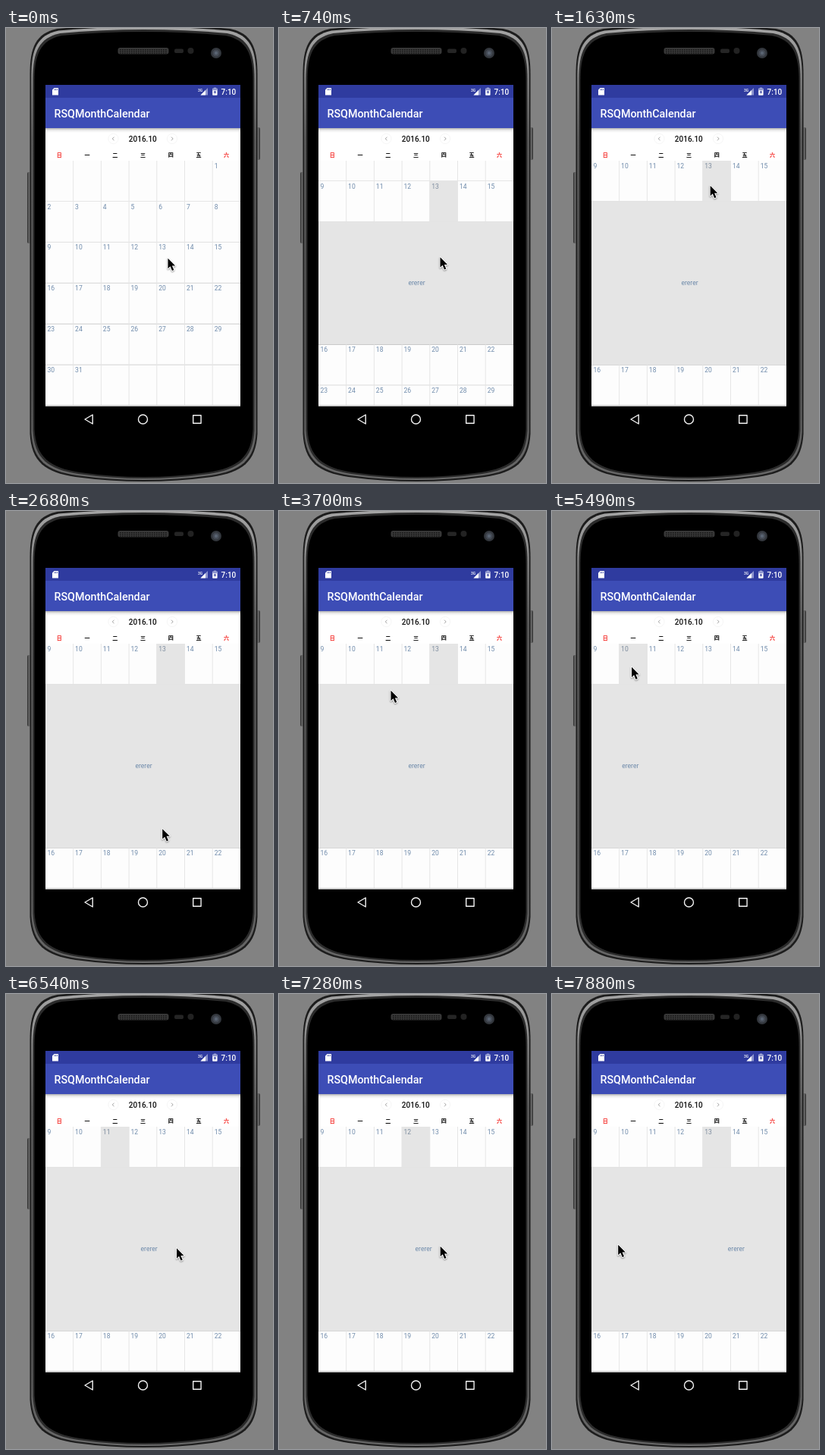
An HTML page with a canvas that plays this animation: 352 by 600 pixels, repeating every 8000 ms.

```html
<!DOCTYPE html>
<html lang="zh">
<head>
<meta charset="utf-8">
<title>Month calendar</title>
<style>
html, body { margin: 0; width: 100%; height: 100%; overflow: hidden; background: #828282; }
canvas { display: block; width: 352px; height: 600px; }
</style>
</head>
<body>
<canvas id="stage"></canvas>
<script>
const W = 352, H = 600, LOOP = 8000, STEP = 148.5;
const canvas = document.getElementById('stage');
const ratio = window.devicePixelRatio || 1;
canvas.width = W * ratio;
canvas.height = H * ratio;
const c = canvas.getContext('2d');

const LEFT = 52, RIGHT = 309, WIDE = RIGHT - LEFT;
const TOP = 175, BOTTOM = 498;
const COL = WIDE / 7, ROW = (BOTTOM - TOP) / 6;
const GREY = '#e5e5e5', LINE = '#e4e4e4', BLUE = '#6f8bab', DARK_BLUE = '#2f3b9f';
const ROBOTO = 'Roboto, sans-serif';
const CJK = '"Noto Sans CJK SC", "Noto Sans CJK JP", "Noto Sans CJK", sans-serif';

// All motion is timed in steps
const TAPS = [27.2, 32.53, 36.35], TAP_TIME = 1.45;
const SWIPE_START = 41, SWIPE_EVERY = 5.08, SWIPE_TIME = 3.6;
const HOME = { x: 213.5, y: 303 };
const MOVES = [
  { from: 0, to: 3, x: 212.5, y: 301.5 },
  { from: 7, to: 11, x: 208.7, y: 207.3 },
  { from: 12, to: 20, x: 222.5, y: 457.5, bow: -20 },
  { from: 20, to: 25, x: 147.5, y: 236 },
  { from: 25, to: 27, x: 170, y: 204 },
  { from: 28, to: 31, x: 136, y: 201 },
  { from: 32, to: 35, x: 105, y: 205 },
  { from: 37, to: 39, x: 216, y: 318 },
  { from: 40, to: 41, x: 225, y: 336 }
];

const clamp = k => Math.max(0, Math.min(1, k));
const smooth = k => k * k * (3 - 2 * k);
const settle = k => 1 - (1 - clamp(k)) ** 2;

// Each tap goes back one day, each swipe forward one day
function pageAt(step) {
  let page = 13;
  TAPS.forEach(tap => page -= settle((step - tap) / TAP_TIME));
  for (let i = 0; i < 3; i++) {
    page += settle((step - SWIPE_START - i * SWIPE_EVERY) / SWIPE_TIME);
  }
  return page;
}

function pointerAt(step) {
  let { x, y } = HOME;
  for (const move of MOVES) {
    const k = clamp((step - move.from) / (move.to - move.from));
    x += (move.x - x) * smooth(k) + (move.bow || 0) * Math.sin(Math.PI * k);
    y += (move.y - y) * smooth(k);
  }
  const since = step - SWIPE_START;
  if (since > 0) {
    x -= 147 * Math.sin(Math.PI * clamp(since % SWIPE_EVERY / 3));
    y -= since / 2;
  }
  return [x, y];
}

function rect(x, y, w, h, fill) {
  c.fillStyle = fill;
  c.fillRect(x, y, w, h);
}

function round(x, y, w, h, r, fill) {
  c.beginPath();
  c.roundRect(x, y, w, h, r);
  c.fillStyle = fill;
  c.fill();
}

function disc(x, y, r, fill) {
  c.beginPath();
  c.arc(x, y, r, 0, 7);
  c.fillStyle = fill;
  c.fill();
}

function ring(x, y, r, stroke, width) {
  c.beginPath();
  c.arc(x, y, r, 0, 7);
  c.strokeStyle = stroke;
  c.lineWidth = width;
  c.stroke();
}

function poly(points, fill, stroke, width = 1, open = false) {
  c.beginPath();
  points.forEach(([x, y]) => c.lineTo(x, y));
  if (!open) c.closePath();
  if (stroke) {
    c.strokeStyle = stroke;
    c.lineWidth = width;
    c.stroke();
  }
  if (fill) {
    c.fillStyle = fill;
    c.fill();
  }
}

function text(str, x, y, font, fill, align = 'left') {
  c.font = font;
  c.fillStyle = fill;
  c.textAlign = align;
  c.fillText(str, x, y);
}

function shade(x0, y0, x1, y1, ...colors) {
  const g = c.createLinearGradient(x0, y0, x1, y1);
  colors.forEach((color, i) => g.addColorStop(i / (colors.length - 1), color));
  return g;
}

function clipped(x, y, w, h, draw) {
  c.save();
  c.beginPath();
  c.rect(x, y, w, h);
  c.clip();
  draw();
  c.restore();
}

// Phone outline with bulging ends, inset at the sides, top and bottom
function outline(side, top, bottom) {
  const l = 31.5 + side, r = 331.5 - side, mid = (l + r) / 2;
  const t = 1 + top, b = 592 - bottom;
  return new Path2D(`M${l} ${t + 60}C${l} ${t + 24} ${l + 8} ${t + 6} ${l + 36} ${t}` +
    `Q${mid} ${t - 10} ${r - 36} ${t}C${r - 8} ${t + 6} ${r} ${t + 24} ${r} ${t + 60}` +
    `V${b - 57}C${r - 2} ${b - 20} ${r - 20} ${b - 6} ${r - 60} ${b}` +
    `Q${mid} ${b + 12} ${l + 60} ${b}C${l + 20} ${b - 6} ${l + 2} ${b - 20} ${l} ${b - 57}Z`);
}

function drawPhone() {
  rect(0, 0, W, H, '#828282');
  round(28, 190, 6, 94, 2, shade(28, 0, 34, 0, '#2c2c2c', '#777', '#333'));
  round(329, 131, 6, 43, 2, shade(329, 0, 335, 0, '#333', '#777', '#2c2c2c'));
  c.fillStyle = '#1d1d1d';
  c.fill(outline(0, 0, 0));
  c.fillStyle = shade(0, 0, 0, H, '#a4a4a4', '#626262', '#585858', '#585858', '#686868');
  c.fill(outline(1.8, 2.5, 2));
  c.fillStyle = '#2b2b2b';
  c.fill(outline(4, 6, 4));
  c.fillStyle = '#000';
  c.fill(outline(6, 9, 6));

  round(147.5, 26, 67, 8.5, 3, '#373737');
  for (let x = 150; x < 213; x += 3) {
    for (let y = 28; y < 34; y += 2.3) rect(x, y, 1.6, 1.2, '#161616');
  }
  round(222, 27.5, 12, 5.5, 2, '#252525');
  disc(243.5, 30, 4, '#222');
  disc(277, 33, 7, '#33373d');
  disc(277, 33, 4.5, '#454b55');
  disc(277, 33, 2.2, '#5a6472');
}

function drawBars() {
  rect(LEFT, 75, WIDE, 17, DARK_BLUE);
  rect(LEFT, 92, WIDE, 40, '#3d4db6');
  poly([[63.5, 79], [69, 79], [69, 88.5], [61, 88.5], [61, 81.5]], '#fff');
  for (let x = 63.6; x < 68; x += 1.7) rect(x, 80.2, 0.8, 2, DARK_BLUE);
  text('3G', 253, 83.5, '500 5px ' + ROBOTO, '#fff');
  poly([[266, 79], [266, 88.5], [256.5, 88.5]], '#8f97cf');
  poly([[263, 82], [263, 88.5], [256.5, 88.5]], '#fff');
  rect(274, 78.5, 3, 1.5, '#8f97cf');
  round(272.2, 79.7, 6.4, 9, 0.8, '#fff');
  rect(272.2, 79.7, 6.4, 2.6, '#8f97cf');
  poly([[276, 82], [273.6, 85], [275.2, 85], [274.8, 87.7], [277.2, 83.8], [275.6, 83.8]], DARK_BLUE);
  text('7:10', 303.3, 87.6, '500 10px ' + ROBOTO, '#fff', 'right');
  text('RSQMonthCalendar', 63.5, 118.2, '500 14.3px ' + ROBOTO, '#fff');
}

function chevron(x, dir) {
  ring(x, 146, 6.6, '#f3f3f3', 0.8);
  poly([[x - dir, 143.7], [x + dir * 1.2, 146], [x - dir, 148.3]], null, '#999', 0.9, true);
}

function drawHeader() {
  rect(LEFT, 132, WIDE, TOP - 132, '#fff');
  rect(LEFT, 132, WIDE, 6, shade(0, 132, 0, 138, 'rgba(0,0,0,.3)', 'rgba(0,0,0,.07)', 'rgba(0,0,0,0)'));
  chevron(141.5, -1);
  chevron(219, 1);
  text('2016.10', 180.3, 149.7, '500 10px ' + ROBOTO, '#111', 'center');
  [...'日一二三四五六'].forEach((day, i) => {
    text(day, LEFT + COL * (i + 0.5), 169.6, 'bold 7.1px ' + CJK, i % 6 ? '#000' : '#f5302c', 'center');
  });
}

function drawWeek(week, y, selected) {
  rect(LEFT, y, WIDE, ROW, '#fdfdfd');
  rect(LEFT, y + ROW - 0.8, WIDE, 0.9, LINE);
  for (let i = 0; i < 7; i++) {
    const x = LEFT + i * COL, day = week * 7 + i - 5;
    if (i) rect(x - 0.5, y, 0.9, ROW, LINE);
    if (day === selected) rect(x - 0.3, y, COL + 0.3, ROW + 0.5, GREY);
    if (day > 0 && day < 32) {
      text(day, x + 2.4, y + 9.8, '8.57px ' + ROBOTO, day === selected ? '#7d8c9e' : BLUE);
    }
  }
}

function drawCalendar(open, page) {
  const selected = open ? Math.round(page) : null;
  const lift = open * ROW * 2, gap = open * ROW * 4;
  const panel = TOP + ROW * 3 - lift;
  for (let week = 0; week < 6; week++) {
    drawWeek(week, TOP + ROW * week - lift + (week > 2 ? gap : 0), selected);
  }
  if (!open) return;
  rect(LEFT, panel - 0.5, WIDE, gap + 0.5, GREY);
  for (let day = Math.floor(page); day <= Math.ceil(page); day++) {
    text('ererer', 170.4 + (day - page) * WIDE, panel + gap / 2 + 2.6, '8.57px ' + ROBOTO, BLUE);
  }
}

function drawNav() {
  rect(LEFT, BOTTOM - 0.7, WIDE, 1.7, '#c9c9c9');
  rect(LEFT, BOTTOM + 1, WIDE, 34, '#000');
  c.lineJoin = 'round';
  poly([[104, 516], [114.2, 510], [114.2, 522]], null, '#f2f2f2', 1.4);
  ring(180.5, 516, 6, '#f2f2f2', 1.4);
  c.strokeRect(246.7, 510.8, 10.4, 10.4);
  c.lineJoin = 'miter';
}

function drawPointer(x, y) {
  const arrow = [[0, 0.8], [0, 14.2], [3.1, 11.3], [5.5, 17], [7.8, 16], [5.4, 10.4], [9.6, 10.4]];
  c.save();
  c.translate(x, y);
  c.lineJoin = 'round';
  c.shadowColor = 'rgba(0,0,0,.4)';
  c.shadowBlur = 2 * ratio;
  c.shadowOffsetY = ratio;
  poly(arrow, null, '#fff', 2);
  c.shadowColor = 'transparent';
  poly(arrow, '#000');
  c.restore();
}

function draw(time) {
  // The screen refreshes in discrete steps
  const step = Math.floor((time % LOOP + 14) / STEP);
  const open = clamp((step - 4) * 0.75);
  c.setTransform(ratio, 0, 0, ratio, 0, 0);
  drawPhone();
  drawBars();
  drawHeader();
  clipped(LEFT, TOP, WIDE, BOTTOM - TOP, () => drawCalendar(open, pageAt(step)));
  drawNav();
  drawPointer(...pointerAt(step));
}

const start = performance.now();
function tick() {
  draw(performance.now() - start);
  requestAnimationFrame(tick);
}
tick();
</script>
</body>
</html>
```
